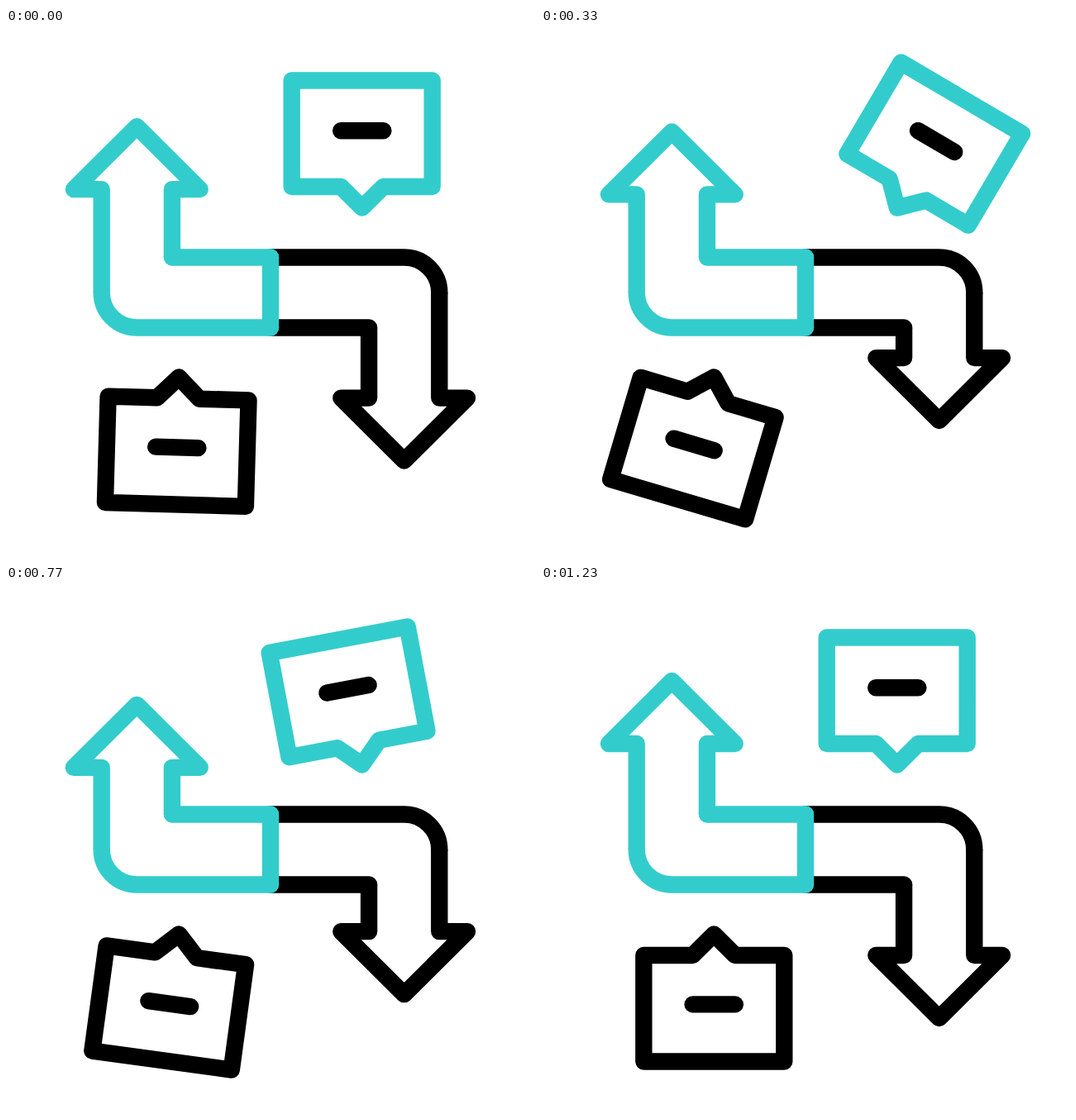
Animation of 640x640 px, one loop 1670 ms. Source, as an HTML page without scripts:

```html
<!DOCTYPE html>
<html lang="en">
<head>
<meta charset="utf-8">
<title>Two-way arrows</title>
<style>
  html, body { margin: 0; height: 100%; overflow: hidden; background: #fff; }
  svg { display: block; width: 100vw; height: 100vh; }
  .line { fill: none; stroke-width: 20.4; stroke-linecap: round; stroke-linejoin: round; }
  .teal { stroke: #3cc; }
  .black { stroke: #000; }

  /* Every part swings out, rebounds and settles with the same smooth easing. */
  .head, .bubble {
    animation: 1670ms cubic-bezier(.3333, 0, .6667, 1) -36ms infinite;
  }
  .bubble { transform-origin: 430.8px 217.5px; }
  .teal .head { animation-name: teal-bounce; }
  .black .head { animation-name: black-bounce; }
  .teal .bubble { animation-name: teal-swing; }
  .black .bubble { animation-name: black-swing; }

  @keyframes teal-bounce {
    0%, 57% { translate: 0 0; }
    14.4% { translate: 0 49.5px; }
    26% { translate: 0 -6px; }
    40.4% { translate: 0 54px; }
  }
  @keyframes black-bounce {
    0%, 1%, 70% { translate: 0 0; }
    24% { translate: 0 50px; }
    34.4% { translate: 0 -15px; }
    54% { translate: 0 40px; }
  }
  @keyframes teal-swing {
    0%, 8.4%, 76% { rotate: 0deg; }
    27.4% { rotate: 38deg; }
    42.2% { rotate: -17.5deg; }
    59.8% { rotate: 7deg; }
  }
  @keyframes black-swing {
    0%, 61.3% { rotate: 0deg; }
    18% { rotate: 39deg; }
    27% { rotate: -15.5deg; }
    48% { rotate: 7.75deg; }
  }
</style>
</head>
<body>
<svg viewBox="0 0 640 640">
  <defs>
    <!-- Hides the shaft ends where they slide behind the bend. -->
    <clipPath id="above-bend"><path d="M0 0H640V277.5H158V320H0Z"/></clipPath>
    <path id="bend" d="M200.9 277.5H320M115.7 320A42.5 42.5 0 0 0 158.2 362.5H320"/>
    <path id="head" d="M200.9 340V192h33.8l-76.4-76l-76.4 76h33.8V340"/>
    <path id="balloon" d="M345.7 63.5H515.7V192H456.5L430.8 217.5L405.2 192H345.7Z"/>
  </defs>

  <g class="line black" transform="rotate(180 320 320)">
    <use href="#bend"/>
    <g clip-path="url(#above-bend)"><use class="head" href="#head"/></g>
    <g class="bubble">
      <use href="#balloon"/>
      <path d="M405.2 132.6H456.4"/>
    </g>
  </g>

  <g class="line teal">
    <use href="#bend"/>
    <path d="M320 277.5V362.5"/>
    <g clip-path="url(#above-bend)"><use class="head" href="#head"/></g>
    <g class="bubble">
      <use href="#balloon"/>
      <path stroke="#000" d="M405.2 124.2H456.4"/>
    </g>
  </g>
</svg>
</body>
</html>
```
